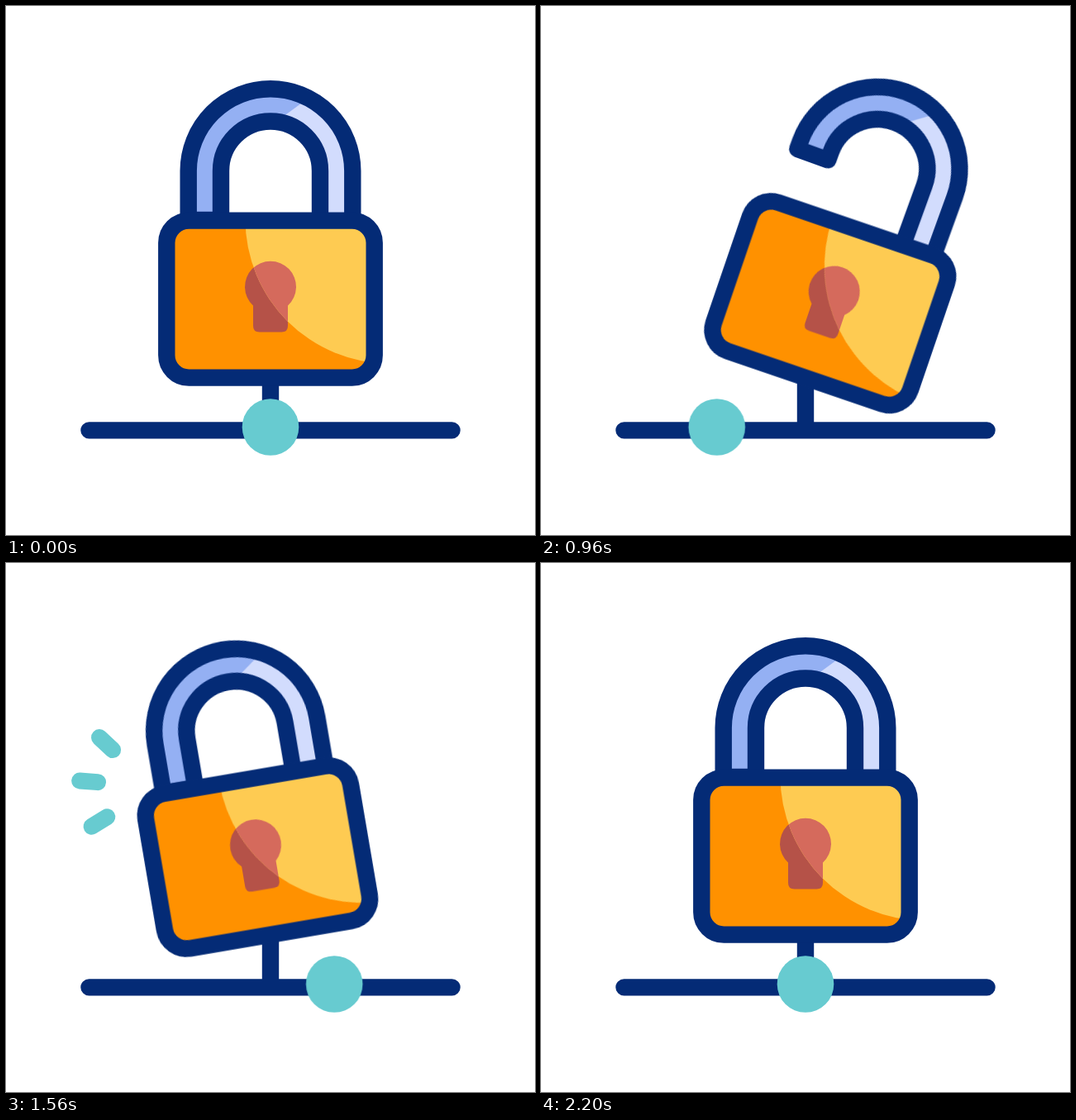
Write an HTML page without scripts that moves like this. It is 640 px wide and 640 px high and loops after 2400 ms.

```html
<!DOCTYPE html>
<html lang="en">
<head>
<meta charset="utf-8">
<title>Swinging padlock</title>
<style>
  @property --head { syntax: "<length>"; inherits: false; initial-value: 0px; }
  @property --tail { syntax: "<length>"; inherits: false; initial-value: 0px; }

  html, body { margin: 0; width: 100%; height: 100%; overflow: hidden; background: #fff; }
  svg { display: block; width: 100vw; height: 100vh; }

  .line { fill: none; stroke: #042b76; stroke-width: 20.4; stroke-linejoin: round; }
  .teal { fill: #67cbd0; }

  .lock, .shackle, .arch, .knob {
    animation: 2.4s cubic-bezier(.333, 0, .667, 1) infinite;
  }
  .lock { transform-origin: 320px 447px; animation-name: swing; }
  .shackle { transform-origin: 400px 293px; animation-name: lift; }
  .arch { animation-name: shorten; }
  .knob { animation-name: slide; }

  .sparks path {
    fill: none; stroke: #67cbd0; stroke-width: 20; stroke-linecap: round;
    stroke-dasharray: calc(var(--head) - var(--tail)) 300px;
    stroke-dashoffset: calc(var(--tail) * -1);
    visibility: hidden;
    animation: head 2.4s cubic-bezier(.333, 0, .667, 1) infinite,
               tail 2.4s cubic-bezier(.333, 0, .667, 1) infinite,
               show 2.4s step-end infinite;
  }

  @keyframes swing {
    0%, 8.333% { transform: rotate(0deg); }
    41.667% { transform: rotate(19deg); }
    62.5% { transform: rotate(-11deg); }
    77.78% { transform: rotate(7deg); }
    91.667%, 100% { transform: rotate(0deg); }
  }
  @keyframes lift {
    0%, 8.333%, 58.333%, 100% { transform: translateY(0px) rotate(0deg); }
    50% { transform: translateY(-18.4px) rotate(1.2deg); }
  }
  @keyframes shorten {
    0%, 8.333%, 58.333%, 100% {
      d: path("M220.7 259V199.5A99.3 99.3 0 0 1 419.3 199.5V300H380V199.5A60 60 0 0 0 260 199.5V259Z");
    }
    50% {
      d: path("M220.7 201.6V199.5A99.3 99.3 0 0 1 419.3 199.5V300H380V199.5A60 60 0 0 0 260 199.5V201.6Z");
    }
  }
  @keyframes slide {
    0%, 8.333% { transform: translateX(0px); }
    41.667% { transform: translateX(-108px); }
    69.8% { transform: translateX(92.5px); }
    82.2%, 100% { transform: translateX(0px); }
  }
  @keyframes head {
    0%, 52.8% { --head: 0px; }
    66.67%, 100% { --head: 70px; }
  }
  @keyframes tail {
    0%, 56.7% { --tail: 0px; }
    70.6%, 100% { --tail: 70px; }
  }
  @keyframes show {
    0% { visibility: hidden; }
    52.8% { visibility: visible; }
    70.5%, 100% { visibility: hidden; }
  }
</style>
</head>
<body>
<svg viewBox="0 0 640 640">
  <defs>
    <clipPath id="shine"><circle cx="464" cy="258" r="174.5"/></clipPath>
    <rect id="body" x="194.3" y="259.6" width="251.4" height="190" rx="27"/>
    <path id="keyhole" d="M299 362.5A31 31 0 1 1 341 362.5V387Q341 394.5 333.5 394.5H306.5Q299 394.5 299 387Z"/>
  </defs>

  <path class="line" stroke-linecap="round" d="M100.5 513.4H539.5M320 440V513"/>

  <g class="sparks">
    <path d="M162.3 257l-51.2-47.7"/>
    <path d="M156.3 268.5l-69.8-5.2"/>
    <path d="M161 283.6l-59.7 36.5"/>
  </g>

  <g class="lock">
    <g class="shackle">
      <path class="arch" fill="#94b0f3" d="M220.7 259V199.5A99.3 99.3 0 0 1 419.3 199.5V300H380V199.5A60 60 0 0 0 260 199.5V259Z"/>
      <path fill="#d2dcfd" d="M334 134.8L361 114.9A93.7 93.7 0 0 1 413.5 199.5V300H386V199.5A66 66 0 0 0 334 134.8Z"/>
      <path class="arch line" d="M220.7 259V199.5A99.3 99.3 0 0 1 419.3 199.5V300H380V199.5A60 60 0 0 0 260 199.5V259Z"/>
    </g>
    <use href="#body" fill="#ff9100"/>
    <use href="#keyhole" fill="#b55248"/>
    <g clip-path="url(#shine)">
      <use href="#body" fill="#fecb52"/>
      <use href="#keyhole" fill="#d56a5c"/>
    </g>
    <use href="#body" class="line"/>
  </g>

  <circle class="knob teal" cx="320" cy="509.5" r="34.3"/>
</svg>
</body>
</html>
```
